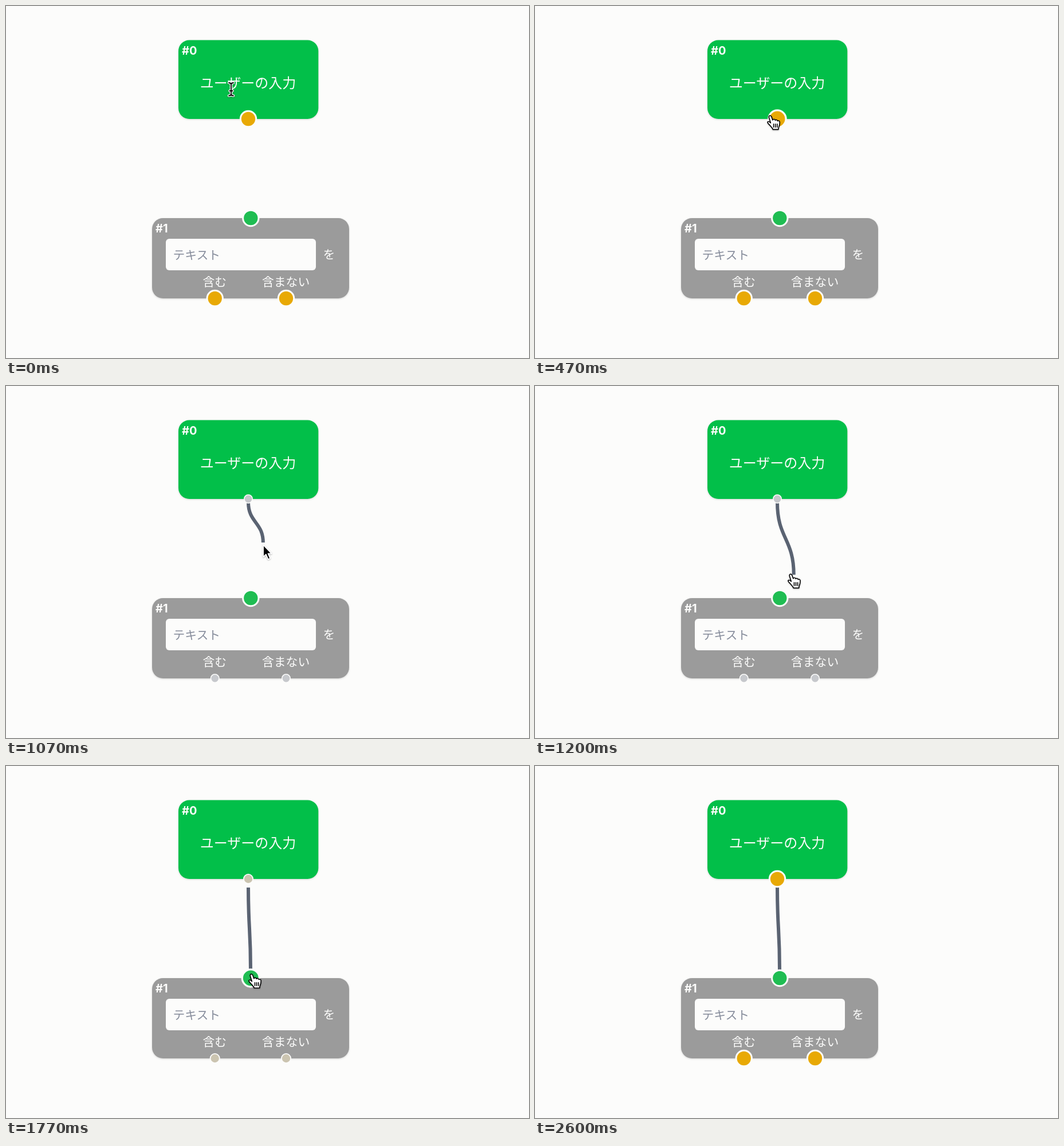
Write an HTML page that moves like this. It is 913x614 px and loops after 3030 ms.

```html
<!DOCTYPE html>
<html lang="ja">
<head>
<meta charset="utf-8">
<style>
  html, body { margin: 0; width: 100%; height: 100%; overflow: hidden; background: #fcfcfb; }
  svg { display: block; width: 913px; height: 614px; }
  text { font: 20.8px "Noto Sans CJK JP", "Noto Sans CJK", sans-serif; fill: #fcfcfb; }
  .title { font-size: 24px; text-anchor: middle; }
  .id { font: 700 20px Inter, sans-serif; }
  .placeholder { fill: #868c9b; }
  .node { filter: drop-shadow(0 1.5px 1.5px rgba(0, 0, 0, .16)); }
  .port { stroke: #fcfcfb; }
  #cursor { filter: drop-shadow(0 1.5px 1px rgba(0, 0, 0, .3)); stroke-linejoin: round; }
</style>
</head>
<body>
<svg viewBox="0 0 913 614">
  <defs>
    <path id="beamShape" d="M-4-11Q-.5-11 0-8.5Q.5-11 4-11M0-8.5V9M-2.5 3H2.5M-4 11.5Q-.5 11.5 0 9Q.5 11.5 4 11.5"/>
  </defs>

  <path id="edge" fill="none" stroke="#5a6372" stroke-width="6"/>

  <rect class="node" x="301" y="59.5" width="244.3" height="137.5" rx="19" fill="#02bf49"/>
  <text class="id" x="307" y="85">#0</text>
  <text class="title" x="422.5" y="143">ユーザーの入力</text>

  <rect class="node" x="255" y="370" width="344" height="140" rx="19" fill="#9b9b9b"/>
  <text class="id" x="261" y="395">#1</text>
  <rect x="279" y="406" width="262" height="55" rx="6" fill="#fcfcfb"/>
  <text class="placeholder" x="291.5" y="441.5">テキスト</text>
  <text x="553.5" y="441">を</text>
  <text x="343.5" y="489">含む</text>
  <text x="447" y="489">含まない</text>

  <circle class="port" id="source" cx="423" cy="197"/>
  <circle class="port" id="target" cx="427.3" cy="370" fill="#1fbd52"/>
  <circle class="port" id="yes" cx="364.7" cy="510"/>
  <circle class="port" id="no" cx="489" cy="510"/>

  <g id="cursor">
    <g id="beam" fill="none" stroke-linecap="round">
      <use href="#beamShape" stroke="#fff" stroke-width="4.5"/>
      <use href="#beamShape" stroke="#000" stroke-width="1.8"/>
    </g>
    <path id="arrow" fill="#000" stroke="#fff" stroke-width="1.7" d="M0-1V20L4.7 15.6L8.5 24.2L12 22.7L8.4 14.3H14.5Z"/>
    <g id="hand" transform="translate(-1.7 -.8)" stroke="#000" stroke-width="1.6" stroke-linecap="round">
      <path fill="#fff" d="M-5.8-1.5C-7-5.5-2.8-6.5-1.4-3L.5 2.5C1.5.5 4.5.8 5 3C6 1.5 8.5 2 9 4.2C11 3 12.7 4 12.8 6.5C13 11 12 13 10.8 16L10.5 19H1C0 16-3 13.5-5.5 10.5C-8 8-9 6.5-7.7 5.3C-6 4.5-4.5 6-3 7.5Z"/>
      <path d="M2.2 9.5v5.5M5.3 9.5v5.5M8.4 9.5v5.5"/>
    </g>
  </g>
</svg>
<script>
const LOOP = 3030, PRESS = 570, RELEASE = 1750, LEAVE = 2570, LAG = 12;
const el = id => document.getElementById(id);
const clamp = v => Math.max(0, Math.min(1, v));
const mix = (a, b, k) => a + (b - a) * k;

// pointer path: time, x, y
const path = [
  [0, 393, 145], [30, 393, 145], [470, 416, 197], [530, 421, 208],
  [929, 421, 208], [930, 446, 217], [1200, 452, 334], [1430, 434, 369],
  [2030, 434, 369], [2270, 448, 393], [LOOP, 448, 393]
];

function pointer(t) {
  const i = path.findIndex(p => p[0] > t);
  const [a, b] = [path[i - 1], path[i]];
  const k = (t - a[0]) / (b[0] - a[0]);
  return [mix(a[1], b[1], k), mix(a[2], b[2], k)];
}

function drawPort(id, size, hover, fill) {
  const port = el(id), scale = hover ? 1.1 : 1;
  port.setAttribute('r', mix(7.2, 13.7, size) * scale);
  port.setAttribute('stroke-width', mix(1.6, 3, size) * scale);
  if (fill) port.setAttribute('fill', fill);
}

function drawEdge(x1, y1, x2, y2) {
  const mid = (y1 + y2) / 2;
  el('edge').setAttribute('d', `M${x1} ${y1}C${x1} ${mid} ${x2} ${mid} ${x2} ${y2}`);
}

function draw(t) {
  const [x, y] = pointer(t);
  const near = (cx, cy) => t < LEAVE && Math.hypot(x - cx, y - cy) < 15;
  const dragging = t >= PRESS && t < RELEASE;

  // 1: large orange port, 0: small grey port
  const size = t < RELEASE ? 1 - clamp((t - PRESS) / 30) : clamp((t - RELEASE) / 150);
  const rgb = [[198, 232], [200, 169], [204, 5]].map(([a, b]) => mix(a, b, size));
  const fill = `rgb(${rgb})`;
  drawPort('source', size, !dragging && near(423, 197), fill);
  drawPort('yes', size, false, fill);
  drawPort('no', size, false, fill);
  drawPort('target', 1, near(427, 370));

  el('edge').style.display = t < PRESS ? 'none' : '';
  if (dragging) drawEdge(423, 203, ...pointer(t - LAG));
  else drawEdge(423, 212, 427, 355);

  const shape = y < 150 ? 'beam'
    : near(423, 197) || near(427, 370) || (dragging && y > 300) ? 'hand' : 'arrow';
  for (const id of ['beam', 'arrow', 'hand']) el(id).style.display = id === shape ? '' : 'none';
  el('cursor').setAttribute('transform', `translate(${x} ${y})`);
  el('cursor').style.display = t < LEAVE ? '' : 'none';
}

function tick() {
  draw(performance.now() % LOOP);
  requestAnimationFrame(tick);
}
tick();
</script>
</body>
</html>
```
